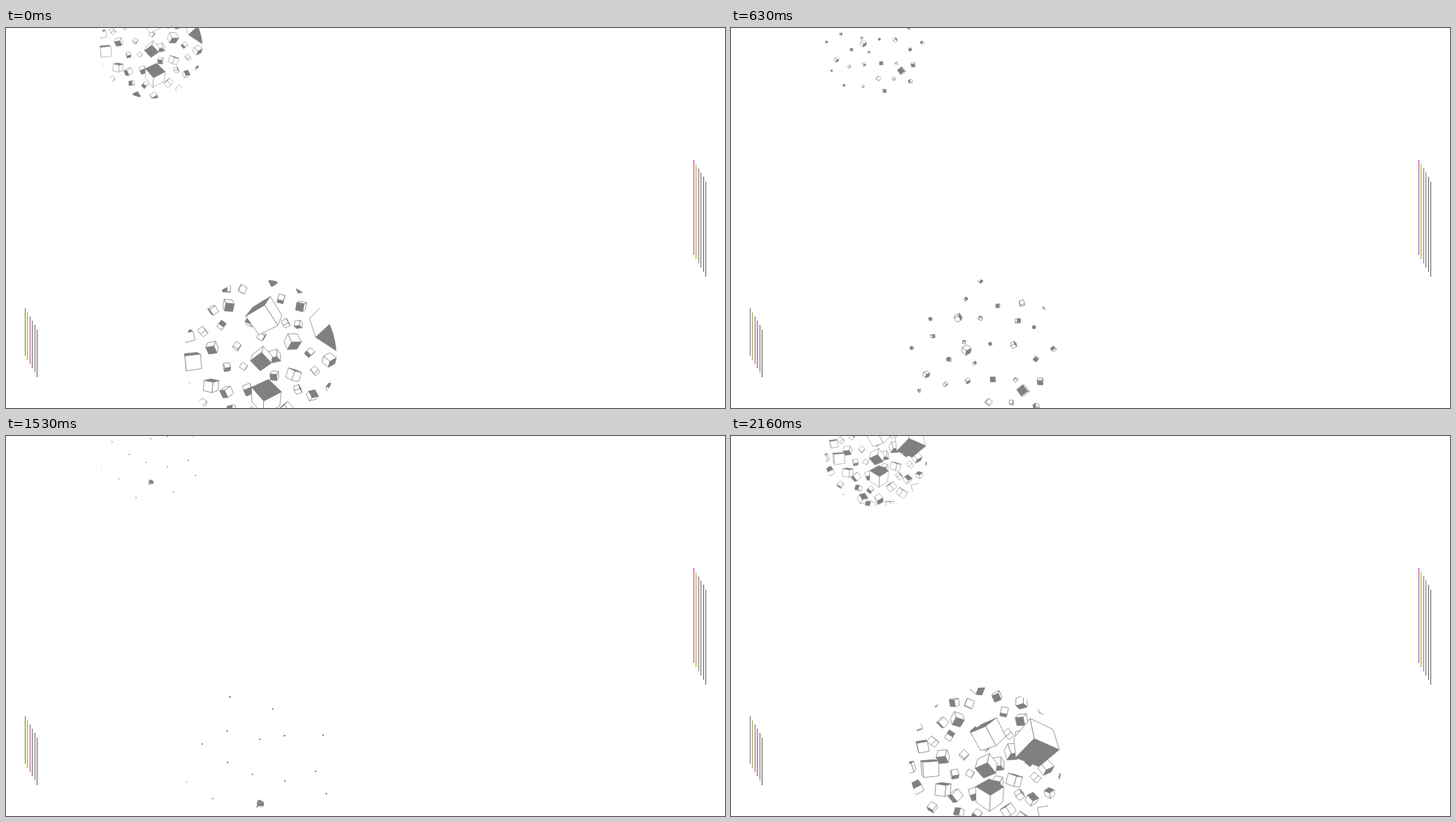
Write an HTML page with a canvas that moves like this. It is 1029 by 544 pixels and loops after 2.19 s.

```html
<!DOCTYPE html>
<html lang="en">
<head>
<meta charset="utf-8">
<title>Cube bursts</title>
<style>
  html, body { margin: 0; width: 100%; height: 100%; overflow: hidden; background: #fff; }
  canvas { display: block; width: 1029px; height: 544px; }
</style>
</head>
<body>
<canvas id="stage" width="1029" height="544"></canvas>
<script>
const ctx = document.getElementById('stage').getContext('2d');
const LOOP = 2190, STEP = 30, GRAY = '#808080';
const RADIUS = 109, FOCAL = 260;
const NEAREST = 1 / 30; // depth of every cube at the explosion; apparent size is 1 / depth
const views = [{ x: 364, y: 469, scale: 1 }, { x: 207.7, y: 27.5, scale: 0.674 }];

function seeded(seed) {
  return () => {
    seed = (seed + 0x6D2B79F5) | 0;
    let t = Math.imul(seed ^ (seed >>> 15), 1 | seed);
    t = (t + Math.imul(t ^ (t >>> 7), 61 | t)) ^ t;
    return ((t ^ (t >>> 14)) >>> 0) / 4294967296;
  };
}

// Cubes spread evenly over a disc at time `at`, around a few large ones.
function makeSwarm({ seed, count, reach, sizes: [small, large], big = [], ...timing }) {
  const random = seeded(seed);
  const spin = () => [0, 0, 0].map(() => (random() - 0.5) / 65);
  const cubes = big.map(([x, y, size]) => ({ x, y, size, spin: spin() }));
  for (let i = 0; i < count; i++) {
    const r = reach * Math.sqrt((i + 0.5) / count), a = seed + i * 2.4;
    const x = r * Math.cos(a) + random() * 12 - 6, y = r * Math.sin(a) + random() * 12 - 6;
    const size = small + (large - small) * random() ** 3;
    const hidden = big.some(b => Math.hypot(b[0] - x, b[1] - y) < b[2] / 2);
    if (!hidden) cubes.push({ x, y, size, spin: spin() });
  }
  return { ...timing, cubes };
}

const swarms = [
  { seed: 4, count: 76, reach: 150, sizes: [11, 23], start: -150, at: 0, from: -149, to: 400, fade: 1,
    big: [[6, -57, 44], [8, 59, 40], [2, 4, 28], [46, -20, 21], [112, -46, 70], [-98, 8, 28]] },
  { seed: 9, count: 36, reach: 118, sizes: [5, 11], start: -150, at: 630, from: 400, to: 885, fade: 1,
    big: [[54, 50, 15], [-27, -8, 12]] },
  { seed: 14, count: 56, reach: 118, sizes: [4.5, 9], start: 600, at: 1140, from: 885, to: 1470, fade: 300,
    big: [[62, -13, 19], [-79, 10, 19], [-35, -93, 13]] },
  { seed: 21, count: 17, reach: 112, sizes: [1.4, 2.1], start: 600, at: 1530, from: 1440, to: 1800, fade: 250 }
].map(makeSwarm);

function turn([x, y, z], [a, b, c]) {
  [x, z] = [x * Math.cos(a) + z * Math.sin(a), z * Math.cos(a) - x * Math.sin(a)];
  [y, z] = [y * Math.cos(b) - z * Math.sin(b), z * Math.cos(b) + y * Math.sin(b)];
  [x, y] = [x * Math.cos(c) - y * Math.sin(c), y * Math.cos(c) + x * Math.sin(c)];
  return [x, y, z];
}

function drawCube({ x, y, size, angles }) {
  const h = size * 0.37;
  const axes = [[h, 0, 0], [0, h, 0], [0, 0, h]].map(v => turn(v, angles));
  const corner = (...vectors) => vectors.reduce((p, v) => p.map((n, i) => n + v[i]), [x, y, 0]);
  const times = (v, k) => v.map(n => n * k);
  axes.forEach((axis, i) => {
    const u = axes[(i + 1) % 3], v = axes[(i + 2) % 3];
    for (const side of [-1, 1]) {
      const normal = times(axis, side), [cx, cy, cz] = corner(normal);
      const facing = -normal[0] * cx - normal[1] * cy + normal[2] * (FOCAL - cz);
      if (facing <= 0) continue;
      ctx.beginPath();
      for (const [p, q] of [[-1, -1], [1, -1], [1, 1], [-1, 1]]) {
        const [px, py, pz] = corner(normal, times(u, p), times(v, q));
        const k = FOCAL / (FOCAL - pz);
        ctx.lineTo(px * k, py * k);
      }
      ctx.closePath();
      ctx.fillStyle = i === 1 ? GRAY : '#fff';
      ctx.fill();
      ctx.stroke();
    }
  });
}

// Straight flight out of the centre, seen in perspective.
function swarmAt({ start, at, from, to, fade, cubes }, time) {
  if (time < from || time >= to) return [];
  const age = time - start, grown = age / (at - start);
  const shrink = Math.min(1, (to - time) / fade);
  return cubes.flatMap(({ x, y, size, spin }) => {
    const depth = NEAREST + (1 / size - NEAREST) * grown;
    if (depth < 0.008) return [];
    const zoom = 1 / (size * depth);
    return {
      x: x * grown * zoom,
      y: y * grown * zoom,
      size: size * zoom * shrink,
      angles: spin.map(s => s * age)
    };
  }).sort((a, b) => a.size - b.size);
}

// The unexploded cubes: stepped dark tops over a pile of white fronts.
function drawCluster(time) {
  if (time < 1440 || time >= 2070) return;
  const random = seeded(5);
  const p = (time - 1530) / 510;
  const depth = 0.1 + (1 / 53 - 0.1) * p;
  const scale = 1 / (53 * depth), tilt = Math.min(1, 0.25 + 0.75 * p);
  ctx.save();
  ctx.translate(0, 5.7 * (1 - p) / depth);
  ctx.scale(scale, scale);
  ctx.lineWidth = 0.9;
  ctx.fillStyle = GRAY;
  for (let k = 0; k < 4; k++) ctx.fillRect(-16 - 3 * k, -27 + 5 * k, 18 + 11 * k, 12);
  ctx.fillRect(-25, -12, 51, 12 + 27 * (1 - tilt));
  ctx.fillStyle = '#fff';
  for (let k = 0; k < 4; k++) ctx.fillRect(-21 + 11 * k, -10 + 4 * random(), 7, 2);
  for (let k = 0; k < 9; k++) {
    const w = 5 + 2 * k, x = -25 + (51 - w) * random();
    const top = -4 + k + 6 * random(), bottom = 20 + 7 * k / 8;
    const box = [x, 27 - (27 - top) * tilt, w, (bottom - top) * tilt];
    ctx.fillRect(...box);
    ctx.strokeRect(...box);
  }
  ctx.restore();
}

function drawBars(x, y, height, colors) {
  colors.forEach((color, i) => {
    ctx.fillStyle = color;
    ctx.fillRect(Math.round(x + i * 3.4), Math.round(y + i * 6.1), 1, height);
  });
}

function draw(time) {
  ctx.fillStyle = '#fff';
  ctx.fillRect(0, 0, 1029, 544);
  drawBars(27, 401, 68, ['#666', '#7ab800', '#b3408f', '#824778', '#666', '#555']);
  drawBars(984, 189, 136, ['#c0308f', '#7ab800', '#a05488', '#666', '#555', '#555']);

  const cubes = swarms.flatMap(s => swarmAt(s, time >= 2040 ? time - LOOP : time));
  for (const view of views) {
    ctx.save();
    ctx.translate(view.x, view.y);
    ctx.scale(view.scale, view.scale);
    ctx.beginPath();
    ctx.arc(0, 0, RADIUS, 0, 7);
    ctx.clip();
    ctx.strokeStyle = GRAY;
    ctx.lineWidth = 0.8;
    cubes.forEach(drawCube);
    drawCluster(time);
    ctx.restore();
  }
}

let begin;
function tick(now) {
  begin ??= now;
  draw(Math.floor((now - begin) / STEP) * STEP % LOOP);
  requestAnimationFrame(tick);
}
draw(0);
requestAnimationFrame(tick);
</script>
</body>
</html>
```
